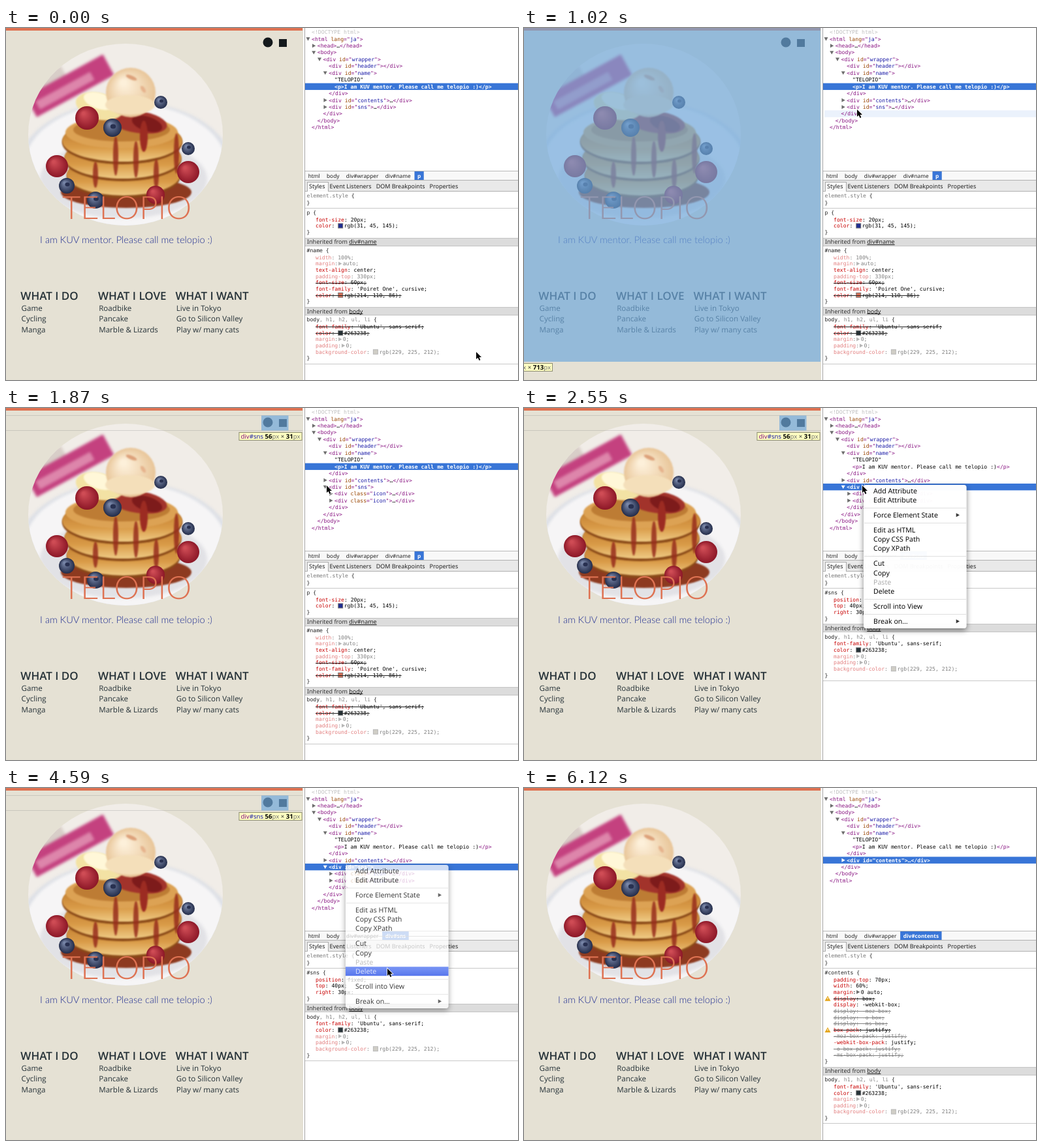
Write an HTML page with a canvas that moves like this. It is 784x540 px and loops after 6290 ms.

```html
<!DOCTYPE html>
<html lang="en">
<head>
<meta charset="utf-8">
<title>Inspecting a profile page</title>
<style>
  html, body { margin: 0; width: 100%; height: 100%; overflow: hidden; background: #fff; }
  canvas { display: block; }
</style>
</head>
<body>
<canvas id="stage" width="784" height="540"></canvas>
<script>
const ctx = document.getElementById('stage').getContext('2d');
const STEP = 170, STEPS = 37;
const MONO = '"DejaVu Sans Mono", monospace', SANS = '"Noto Sans", sans-serif';
const BLUE = '#3875d7', TINT = 'rgba(111,168,220,.68)';
const NAME = 'TELOPIO', INTRO = 'I am KUV mentor. Please call me telopio :)';

// ---------- helpers ----------
function rect(color, x, y, w, h) {
  ctx.fillStyle = color;
  ctx.fillRect(x, y, w, h);
}
function put(text, x, y, color, font) {
  ctx.font = font;
  ctx.fillStyle = color;
  ctx.fillText(text, x, y);
  return x + ctx.measureText(text).width;
}
function poly(color, ...p) {
  ctx.beginPath();
  for (let i = 0; i < p.length; i += 2) ctx.lineTo(p[i], p[i + 1]);
  ctx.closePath();
  ctx.fillStyle = color;
  ctx.fill();
}
function oval(color, x, y, rx, ry = rx, turn = 0) {
  ctx.beginPath();
  ctx.ellipse(x, y, rx, ry, turn, 0, 7);
  ctx.fillStyle = color;
  ctx.fill();
}
function fade(y0, y1, ...colors) {
  const g = ctx.createLinearGradient(0, y0, 0, y1);
  colors.forEach((c, i) => g.addColorStop(i / (colors.length - 1), c));
  return g;
}
function ball(x, y, r, light, dark) {
  const g = ctx.createRadialGradient(x - r * .3, y - r * .4, r * .1, x, y, r);
  g.addColorStop(0, light);
  g.addColorStop(1, dark);
  oval(g, x, y, r);
}
function triangle(x, y, open, color = '#6e6e6e') {
  if (open) poly(color, x - 3, y - 2.5, x + 3, y - 2.5, x, y + 2.8);
  else poly(color, x - 2.3, y - 3, x + 3, y, x - 2.3, y + 3);
}

// ---------- web page ----------
function photo() {
  ctx.save();
  ctx.beginPath();
  ctx.ellipse(183, 163.5, 149, 139.5, 0, 0, 7);
  ctx.clip();
  rect('#f1ede8', 30, 20, 305, 290);
  ctx.filter = 'blur(2px)';

  // tilted poster
  ctx.save();
  ctx.translate(98, 84);
  ctx.rotate(-.5);
  rect('#b3a41e', -40, -62, 130, 24);
  rect('#d8cec8', -70, -30, 70, 30);
  rect('#c4417f', -70, -14, 135, 36);
  rect('#dd86ab', -60, 0, 95, 14);
  ctx.restore();

  oval('#dde0e6', 183, 216, 165, 104);
  oval('#f6f5f6', 183, 212, 155, 97);
  oval('#e2e2e6', 180, 232, 128, 60);

  // stack and sauce
  ctx.filter = 'blur(1.2px)';
  oval('#8d3a20', 184, 252, 100, 24);
  for (let i = 0; i < 3; i++) {
    const y = 225 - 26 * i, r = 87 + 2.5 * i;
    oval('#8a4a19', 180 - i, y + 3, r, 33);
    oval(fade(y - 32, y + 32, '#e2ab5e', '#c78535', '#d99b48', '#efcb85'), 180 - i, y, r, 32);
  }
  oval('#dca254', 177, 160, 86, 25);
  oval('#bd7c34', 177, 156, 74, 18);
  for (let i = 0; i < 5; i++) {
    const h = 20 + 11 * Math.abs(Math.sin(i * 2));
    oval('rgba(150,45,28,.85)', 137 + 31 * i, 207 + 18 * Math.cos(i * 2.2), 4, h);
  }
  oval('#a2332b', 202, 144, 45, 17, .15);
  oval('#7d1b1b', 216, 147, 24, 11, .3);
  oval('#9c2b22', 211, 166, 6, 24);

  // cream and ice
  oval('#f3e2a4', 143, 120, 37, 20, .25);
  oval('#fff7d8', 143, 112, 25, 12, .3);
  ball(191, 99, 38, '#fdf0da', '#e8c598');
  oval('#f4dfba', 190, 118, 38, 15);
  oval('#dda27b', 192, 76, 9, 3, .4);
  oval('#e6b48e', 210, 94, 6, 3, 1);

  ctx.filter = 'blur(.6px)';
  [[124, 138, 18], [78, 212, 17], [279, 221, 17], [229, 256, 14]].forEach(p => ball(...p, '#cf4c55', '#8c1727'));
  [[163, 153, 14], [237, 114, 10], [279, 185, 10], [93, 242, 12], [137, 264, 13]].forEach(([x, y, r]) => {
    ball(x, y, r, '#7886a8', '#232c4a');
    oval('#283050', x + 1, y - 2, r * .3, r * .25);
  });
  ctx.restore();
}
function page(iconsShown) {
  rect('#e5e1d4', 0, 0, 455, 540);
  rect('#de7252', 0, 0, 454, 4);
  photo();
  if (iconsShown) {
    oval('#14191c', 401, 22, 7.5);
    rect('#14191c', 418, 17, 12, 12);
  }
  ctx.textAlign = 'center';
  put(NAME, 185, 293, '#de7252', '300 49px Lato, sans-serif');
  put(INTRO, 184, 330, '#1f2d91', '300 14.7px Lato, sans-serif');
  ctx.textAlign = 'left';
  [
    ['WHAT I DO', 'Game', 'Cycling', 'Manga'],
    ['WHAT I LOVE', 'Roadbike', 'Pancake', 'Marble & Lizards'],
    ['WHAT I WANT', 'Live in Tokyo', 'Go to Silicon Valley', 'Play w/ many cats'],
  ].forEach(([head, ...items], col) => {
    const x = 22.3 + 118.6 * col;
    put(head, x, 417, '#263238', '600 17px "Open Sans", sans-serif');
    items.forEach((s, i) => put(s, x + 1.3, 433.7 + i * 16.4, '#263238', '11.6px "Open Sans", sans-serif'));
  });
}
function tip(selector, w, h, right, y) {
  const plain = '9.6px ' + SANS, bold = 'bold ' + plain;
  const parts = [['div', '#881280', plain], [selector, '#1a1aa6', plain], [' ' + w, '#000', bold], ['px', '#777', plain],
    [' × ', '#333', plain], [h, '#000', bold], ['px', '#777', plain]];
  const width = parts.reduce((sum, [s, , f]) => (ctx.font = f, sum + ctx.measureText(s).width), 0);
  let x = right - 3 - width;
  rect('#8d8d70', x - 3, y, width + 6, 13);
  rect('#ffffc2', x - 2, y + 1, width + 4, 11);
  parts.forEach(([s, color, font]) => x = put(s, x, y + 9.8, color, font));
}
function highlight(hover) {
  if (hover === 'wrapper') {
    rect(TINT, 0, 0, 454, 512);
    tip('#wrapper', 456, 713, 44, 514);
  } else if (hover === 'sns') {
    for (const y of [11, 34]) rect('rgba(120,120,120,.25)', 0, y, 454, 1);
    rect(TINT, 391, 11.5, 41.5, 23);
    tip('#sns', 56, 31, 453.5, 37);
  }
}

// ---------- element tree: level, arrow (1 closed, 2 open), text, id ----------
function treeRows(sns) {
  const icon = [4, 1, '<div class="icon">…</div>'];
  return [
    [0, 0, '<!DOCTYPE html>'], [0, 2, '<html lang="ja">'], [1, 1, '<head>…</head>'], [1, 2, '<body>'],
    [2, 2, '<div id="wrapper">'], [3, 0, '<div id="header"></div>'], [3, 2, '<div id="name">'],
    [4, 0, `"${NAME}"`], [4, 0, `<p>${INTRO}</p>`, 'p'], [3, 0, '</div>'],
    [3, 1, '<div id="contents">…</div>', 'contents'],
    ...(sns === 'closed' ? [[3, 1, '<div id="sns">…</div>', 'sns']] : []),
    ...(sns === 'open' ? [[3, 2, '<div id="sns">', 'sns'], icon, icon, [3, 0, '</div>']] : []),
    [2, 0, '</div>'], [1, 0, '</body>'], [0, 0, '</html>'],
  ];
}
function markup(text, x, y, font) {
  if (text.startsWith('<!')) return put(text, x, y, '#c0c0c0', font);
  const colors = ['#881280', '#994500', '#881280', '#1a1aa6'];
  for (const bit of text.match(/<[^>]*>|[^<]+/g)) {
    if (bit[0] !== '<') x = put(bit, x, y, '#000', font);
    else bit.split(/( \w+)(=")([^"]*)/).forEach((s, i) => x = put(s, x, y, colors[i % 4], font));
  }
}
function tree(sns, selected, hoverRow) {
  const font = '8.17px ' + MONO;
  treeRows(sns).forEach(([level, arrow, text, id], i) => {
    const x = 468 + 8.75 * level, y = 6.4 + 10.43 * i, on = id === selected;
    if (on) rect(BLUE, 458, y - 5.2, 326, 10.4);
    else if (i === hoverRow) rect('#ebf2fc', 460, y - 5.2, 324, 10.4);
    if (arrow) triangle(x - 5.5, y, arrow === 2, on ? '#fff' : undefined);
    if (on) put(text, x, y + 2.8, '#fff', 'bold ' + font);
    else markup(text, x, y + 2.8, font);
  });
}

// ---------- breadcrumb and tabs ----------
function bars(selected) {
  rect('#b8b8b8', 458, 219, 326, 1);
  rect('#f8f8f8', 458, 220, 326, 13);
  rect('#b0b0b0', 458, 233, 326, 1);
  rect('#e9e9e9', 458, 234, 326, 16);
  rect('#b0b0b0', 458, 250, 326, 1);
  const crumbs = ['html', 'body', 'div#wrapper', ...(selected === 'p' ? ['div#name', 'p'] : ['div#' + selected])];
  let x = 462.7;
  crumbs.forEach((s, i) => {
    const on = i === crumbs.length - 1, font = (on ? 'bold ' : '') + '8.3px ' + SANS;
    ctx.font = font;
    if (on) rect(BLUE, x - 4.5, 220, ctx.measureText(s).width + 9, 13);
    x = put(s, x, 229.7, on ? '#fff' : '#222', font) + 10.3;
  });
  rect('#a8a8a8', 461, 236, 33, 14);
  rect('#fafafa', 462, 237, 31, 14);
  x = 464;
  for (const s of ['Styles', 'Event Listeners', 'DOM Breakpoints', 'Properties'])
    x = put(s, x, 246.3, '#222', '9px ' + SANS) + 7;
}

// ---------- style rules; marks: ~ struck, . faded, x unknown, ! warning ----------
const bodyRule = mark => ['body, h1, h2, ul, li', [mark + "font-family: 'Ubuntu', sans-serif", mark + 'color: #263238',
  '.margin: 0', '.padding: 0', '.background-color: rgb(229, 225, 212)'], 'body'];
const RULES = {
  p: [
    ['p', ['font-size: 20px', 'color: rgb(31, 45, 145)']],
    ['#name', ['.width: 100%', '.margin: auto', 'text-align: center', '.padding-top: 330px', '~font-size: 60px',
      "font-family: 'Poiret One', cursive", '~color: rgb(214, 110, 86)'], 'div#name'],
    bodyRule('~'),
  ],
  sns: [
    ['#sns', ['position: fixed', 'top: 40px', 'right: 30px']],
    bodyRule(''),
  ],
  contents: [
    ['#contents', ['padding-top: 70px', 'width: 60%', 'margin: 0 auto', '!display: box', 'display: -webkit-box',
      'xdisplay: -moz-box', 'xdisplay: -o-box', 'xdisplay: -ms-box', '!box-pack: justify', 'x-moz-box-pack: justify',
      '-webkit-box-pack: justify', 'x-o-box-pack: justify', 'x-ms-box-pack: justify']],
    bodyRule(''),
  ],
};
const CODE = '8.12px ' + MONO;

function property(line, y) {
  const [, mark, name, value] = line.match(/^([~.x!]?)(.*?): (.*)$/);
  const gray = mark === 'x' && '#808080';
  ctx.globalAlpha = mark === '.' ? .5 : 1;
  let x = put(name, 474, y + 2.8, gray || '#c80000', CODE);
  x = put(':', x, y + 2.8, gray || '#000', CODE);
  if (/^(margin|padding)$/.test(name)) {
    triangle(x + 3.2, y);
    x += 7.5;
  } else x += 4.9;
  if (/^(rgb|#)/.test(value)) {
    rect('#777', x, y - 4, 8, 8);
    rect(value, x + 1, y - 3, 6, 6);
    x += 9.5;
  }
  x = put(value + ';', x, y + 2.8, gray || '#000', CODE);
  if (mark && mark !== '.') rect(gray || '#222', 474, Math.round(y), x - 474, 1);
  if (mark === '!') {
    poly('#e5a51a', 465, y - 4, 469.5, y + 4, 460.5, y + 4);
    rect('#fff', 464.5, y - 1.5, 1, 3);
  }
  ctx.globalAlpha = 1;
}
function styles(selected) {
  const x = put('element.style', 460.5, 259.8, '#777', CODE);
  put(' {', x, 259.8, '#222', CODE);
  put('}', 460.5, 270.8, '#222', CODE);
  rect('#c8c8c8', 458, 276, 326, 1);
  let y = 283;
  for (const [selector, props, parent] of RULES[selected]) {
    if (parent) {
      rect('#c4c4c4', 458, Math.round(y - 6.5), 326, 13);
      rect('#dcdcdc', 458, Math.round(y - 5.5), 326, 11);
      const from = put('Inherited from ', 461, y + 3.2, '#333', '9px ' + SANS);
      const to = put(parent, from, y + 3.2, '#222', '9px ' + SANS);
      rect('#222', from, Math.round(y + 4), to - from, 1);
      y += 13;
    }
    const [first, rest = ''] = selector.split(/(?=, h1)/);
    let hx = put(first, 460.5, y + 2.8, '#222', CODE);
    hx = put(rest, hx, y + 2.8, '#888', CODE);
    put(' {', hx, y + 2.8, '#222', CODE);
    props.forEach((line, i) => property(line, y + 10.8 + 9.65 * i));
    y += 10.8 + 9.65 * props.length;
    put('}', 460.5, y + 2.8, '#222', CODE);
    y += 15;
  }
  rect('#c8c8c8', 458, Math.round(y - 7), 326, 1);
}

// ---------- context menu ----------
const GROUPS = [['Add Attribute', 'Edit Attribute'], ['Force Element State'], ['Edit as HTML', 'Copy CSS Path', 'Copy XPath'],
  ['Cut', 'Copy', 'Paste', 'Delete'], ['Scroll into View'], ['Break on…']];

function menu(alpha, [px, py]) {
  const box = new Path2D(), outside = new Path2D();
  box.roundRect(520, 118, 157.5, 220, 4);
  outside.rect(0, 0, 784, 540);
  outside.addPath(box);
  ctx.save();
  ctx.globalAlpha = alpha;

  // the shadow stays outside so the faded menu keeps clear
  ctx.save();
  ctx.clip(outside, 'evenodd');
  ctx.shadowColor = 'rgba(0,0,0,.5)';
  ctx.shadowBlur = 9;
  ctx.shadowOffsetY = 3;
  ctx.fill(box);
  ctx.restore();

  ctx.fillStyle = '#fff';
  ctx.fill(box);
  let y = 127;
  GROUPS.forEach((group, g) => {
    if (g) {
      rect('#dedede', 521, Math.round(y - 11.5), 156, 1);
    }
    for (const label of group) {
      const off = label === 'Paste';
      const on = !off && px > 520 && Math.abs(py - y) < 7;
      if (on) rect(fade(y - 7, y + 7, '#4f74f2', '#1f48e6'), 520, y - 7, 157.5, 14);
      put(label, 535, y + 3.8, on ? '#fff' : off ? '#aaa' : '#000', '10.6px ' + SANS);
      if (/State|Break/.test(label)) triangle(664, y, false, '#333');
      y += 14.2;
    }
    y += 8.8;
  });
  ctx.restore();
}

// ---------- pointer: step, x, y ----------
const PATH = [[0, 720, 497], [6, 510, 125], [9, 491, 119], [12, 491, 119], [14, 518, 119], [16, 518, 119],
  [21, 584, 190], [26, 584, 277], [28, 584, 277], [36, 616, 545]];

function pointerAt(step) {
  const i = Math.max(1, PATH.findIndex(p => p[0] >= step));
  const [a, ax, ay] = PATH[i - 1], [b, bx, by] = PATH[i];
  let k = (step - a) / (b - a);
  k = k * k * (3 - 2 * k);
  return [ax + (bx - ax) * k, ay + (by - ay) * k];
}
function pointer(x, y) {
  ctx.save();
  ctx.translate(x, y);
  ctx.lineWidth = 1.6;
  ctx.strokeStyle = '#fff';
  poly('#000', 0, 0, 0, 11, 2.6, 8.7, 4.5, 13, 6.4, 12.2, 4.6, 8.1, 8, 8);
  ctx.stroke();
  ctx.fill();
  ctx.restore();
}

function draw(step) {
  const at = pointerAt(step);
  const gone = step >= 29;
  const selected = gone ? 'contents' : step >= 13 ? 'sns' : 'p';
  const hover = gone || step < 5 ? '' : step < 7 ? 'wrapper' : 'sns';
  const hoverRow = step < 5 || step > 9 ? -1 : step < 7 ? 12 : 11;
  rect('#fff', 0, 0, 784, 540);
  page(!gone);
  highlight(hover);
  rect('#a3a3a3', 457, 0, 1, 540);
  tree(gone ? '' : step >= 10 ? 'open' : 'closed', selected, hoverRow);
  bars(selected);
  styles(selected);
  if (step >= 15 && step <= 28) menu(step < 27 ? .97 : step === 27 ? .75 : .25, at);
  pointer(...at);
}

ctx.textRendering = 'geometricPrecision';
const start = performance.now();
let shown = -1;
function tick() {
  const step = Math.floor((performance.now() - start) / STEP) % STEPS;
  if (step !== shown) draw(shown = step);
  requestAnimationFrame(tick);
}
tick();
</script>
</body>
</html>
```
